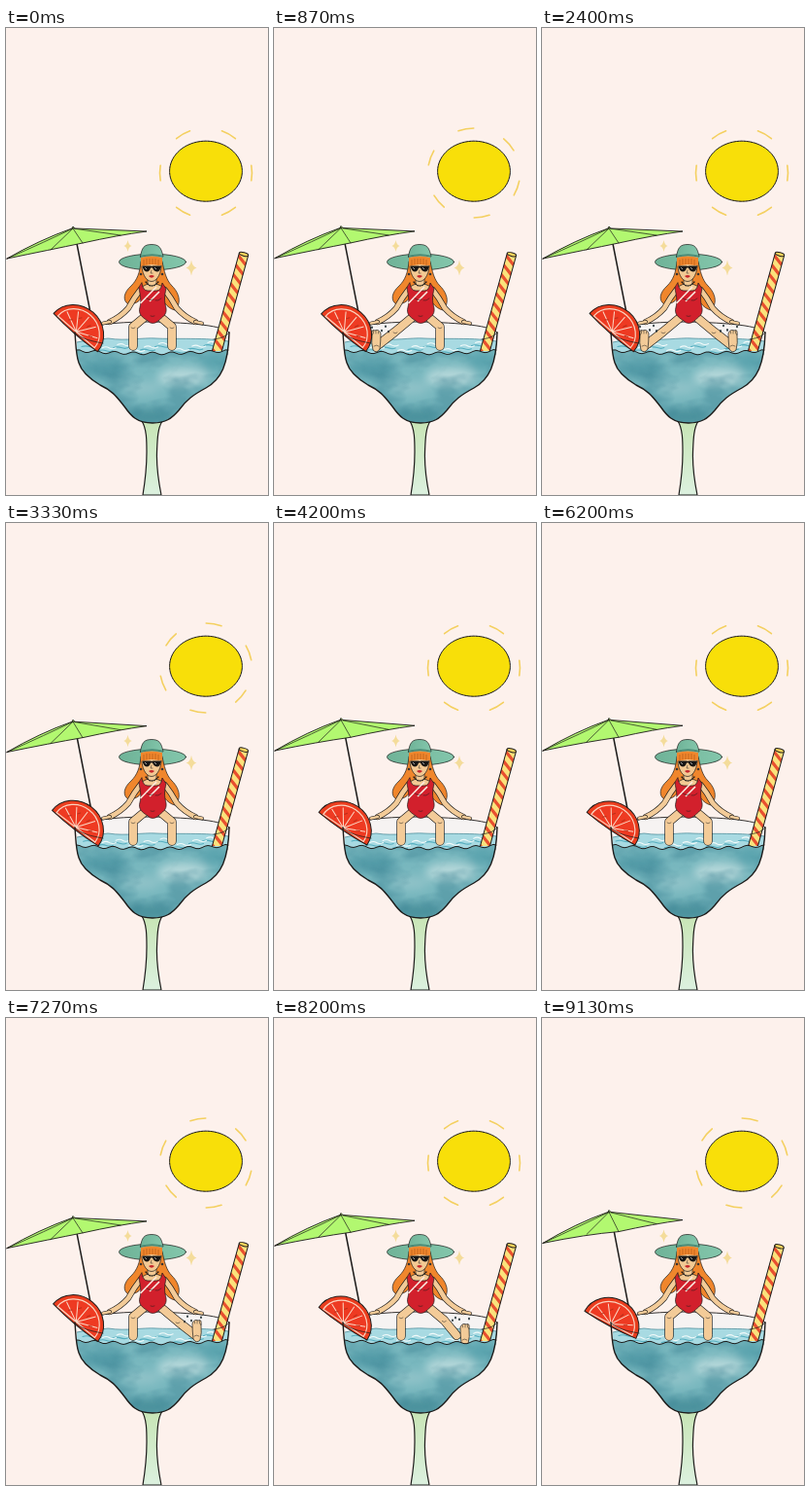
Recreate the animation shown at these times as an HTML page. Size 270x480 px, loop 9190 ms.

```html
<!DOCTYPE html>
<html lang="en">
<head>
<meta charset="utf-8">
<title>Summer cocktail</title>
<style>
html, body { margin: 0; width: 100%; height: 100%; overflow: hidden; background: #fdf1ec; }
svg { display: block; width: 100vw; height: 100vh; }
.ink { stroke: #1d1c1b; stroke-linecap: round; stroke-linejoin: round; }
.line { fill: none; }
.thin { stroke-width: .7; }
.limb { fill: none; stroke-linecap: round; stroke-linejoin: round; }
</style>
</head>
<body>
<svg viewBox="0 0 270 480">
  <defs>
    <filter id="blur" x="-50%" y="-50%" width="200%" height="200%"><feGaussianBlur stdDeviation="5"/></filter>
    <filter id="wash" x="0" y="0" width="100%" height="100%" color-interpolation-filters="sRGB">
      <feTurbulence type="fractalNoise" baseFrequency=".03 .05" numOctaves="3" seed="4"/>
      <feColorMatrix values="0 0 0 0 .22  0 0 0 0 .5  0 0 0 0 .57  3 0 0 0 -1.2"/>
    </filter>
    <linearGradient id="stem" x2="0" y2="1"><stop stop-color="#c8e5b6"/><stop offset="1" stop-color="#dcf1df"/></linearGradient>
    <linearGradient id="felt"><stop stop-color="#6fb398"/><stop offset="1" stop-color="#83c6ab"/></linearGradient>
    <clipPath id="liquid"><path id="liquidShape"/></clipPath>
    <clipPath id="aboveWater"><rect width="270" height="332"/></clipPath>
  </defs>

  <rect width="270" height="480" fill="#fdf1ec"/>

  <ellipse class="ink" cx="206" cy="147.2" rx="37.4" ry="31" fill="#f8df09" stroke-dasharray="3 .5"/>
  <g id="rays" fill="none" stroke="#f4d060" stroke-width="1.6" stroke-linecap="round"></g>

  <path id="stick" class="ink line" stroke-width="1.5"/>
  <path id="canopy" class="ink" fill="#b2f870" stroke-width=".9"/>
  <path id="ribs" class="ink line thin"/>

  <path d="M140 404C145 412 145 424 145 436C145 452 143 468 141 480H160C157 465 155 450 155.500 436C156 424 156 412 161 404Z" class="ink" fill="url(#stem)" stroke-width="1.200"/>
  <path d="M72 315C76 306 110 302 150 302C192 303 225 306 230 313L229 322H73Z" fill="#f6f3f2"/>
  <path d="M72 315C76 306 110 302 150 302C192 303 225 306 230 313" class="ink line" stroke-width=".9"/>
  <path d="M73 323C84 320 95 321 105 319C125 322 140 318 155 319S210 318 229 322V336H73Z" fill="#a8dae2"/>
  <path d="M73 323C84 320 95 321 105 319C125 322 140 318 155 319S210 318 229 322" class="line" stroke="#3f8492" stroke-width=".7"/>
  <g id="ripples" fill="none" stroke-linecap="round"></g>

  <g clip-path="url(#aboveWater)"><g id="straw"></g></g>

  <g id="woman">
    <ellipse class="ink thin" cx="151" cy="240.500" rx="34.500" ry="8.300" fill="url(#felt)"/>
    <path class="ink thin" fill="#f0862c" d="M139 240C138 252 135 259 129 265C121 272 120 280 126 284C135 284 141 279 142 271H159C160 280 166 288 174 290C181 283 179 273 171 265C165 259 163 250 161 240Z"/>
    <path class="ink thin" fill="#f3c993" d="M146 257V263L138 267L140 278H161L164 267L155 263V257Z"/>
    <g id="arms"></g>
    <g id="legs"></g>
    <path class="ink thin" fill="#d2202c" d="M140 262Q141 270 146 270H155Q160 270 161 262L165 268C163 276 163 280 165 288C166 295 161 297 157 301Q151 306 146 301C140 297 136 294 138 287C140 280 138 274 137 267Z"/>
    <path d="M155 266L138.500 283M158 271L148 281" stroke="#fbe9df" stroke-width="1.600" fill="none"/>
    <path d="M145 278Q149 281 152 279M154 280Q157 281 160 278M149 296Q151 297 153 296" class="ink line" stroke-width=".5"/>
    <path d="M144 261Q150 269 157 261" class="ink line" stroke-width="1.300" stroke-dasharray="1 1.500"/>
    <path class="ink thin" fill="#f3c993" d="M140 240C139 251 144 260.500 150 260.500C156 260.500 161 251 160 240Z"/>
    <path fill="#f0862c" d="M139 236Q150 233 161 236L161 244Q156 244 150 243Q144 244 139 245Z"/>
    <path d="M142 238V244M145 237V243M148 237V243M151 237V243M154 237V243M157 238V244" stroke="#a9521a" stroke-width=".6"/>
    <path fill="#171615" d="M140.500 244.500H149.400L150 245L151 244.500H160Q159 250.500 155.500 250.500Q152 250 151 246.500H149Q148 250.500 145 250.500Q141.500 250 140.500 244.500Z"/>
    <path d="M143 246L145 248M153 246L155 248" stroke="#fff" stroke-width=".6"/>
    <path d="M150 249L149 252H151" class="ink line" stroke-width=".5"/>
    <path d="M147 255Q150 253 153 255Q150 258.500 147 255Z" fill="#c6272b"/>
    <circle cx="139" cy="253" r="1.300" fill="#3b3430"/><circle cx="161" cy="253" r="1.300" fill="#3b3430"/>
    <path class="ink thin" fill="url(#felt)" d="M138.500 235C140 226 142 222.500 150 222.500C158 222.500 160 226 162 235Q151 232 138.500 235Z"/>
    <path d="M139 234.500Q151 231.500 161.500 234.500" fill="none" stroke="#4e917c" stroke-width="1.400"/>
  </g>

  <g clip-path="url(#liquid)">
    <rect x="70" y="325" width="165" height="85" fill="#78b7be"/>
    <g filter="url(#blur)">
      <ellipse cx="100" cy="350" rx="26" ry="10" fill="#559ca8"/>
      <ellipse cx="215" cy="342" rx="16" ry="10" fill="#5ba4af"/>
      <ellipse cx="182" cy="359" rx="26" ry="10" fill="#b3d7d9"/>
      <ellipse cx="140" cy="370" rx="20" ry="7" fill="#8fc2c8"/>
      <ellipse cx="148" cy="400" rx="26" ry="10" fill="#4c929d"/>
    </g>
    <rect x="70" y="325" width="165" height="85" filter="url(#wash)" opacity=".4"/>
  </g>
  <path id="waterline" class="ink line"/>

  <g id="slice"></g>
  <path id="glass" class="ink line" stroke-width="1.400"/>
  <path d="M71 313C76 319 88 322 100 324M230 313C226 318 220 319 214 320" class="ink line thin"/>
  <g id="drops" fill="#1f2d33"></g>
  <g id="stars" fill="#f4dc9a"></g>
</svg>

<script>
const LOOP = 9190, FRAMES = 138, SWAY = 12;
const SKIN = '#f3cb98';
const BOWL = 'C72 325 72 336 75 344C78 354 87 361 97 367C110 373 114 379 122 389C129 399 135 406 151 406C165 406 171 401 178 393C186 382 193 377 206 370C222 361 229 346 230 313';
const $ = id => document.getElementById(id);
const mix = (a, b, k) => a + (b - a) * k;
const smooth = x => { x = Math.min(1, Math.max(0, x)); return x * x * (3 - 2 * x); };
const hold = (t, from, to) => smooth((t - from) / 260) * (1 - smooth((t - to) / 260));
const path = (d, attrs = '') => `<path d="${d}" ${attrs}/>`;
const setPath = (id, d) => $(id).setAttribute('d', d);
const mirror = body => `<g transform="translate(302 0) scale(-1 1)">${body}</g>`;

function limb(d, w) {
  return path(d, `class="limb" stroke="#1d1c1b" stroke-width="${w + 1.3}"`) +
         path(d, `class="limb" stroke="${SKIN}" stroke-width="${w}"`);
}

function drawRays(f) {
  const pt = a => `${206 + 47.5 * Math.cos(a)} ${149 + 46 * Math.sin(a)}`;
  let d = '';
  for (let i = 0; i < 6; i++) {
    const a = (i * 60 + f % 3 * 20) * Math.PI / 180;
    d += `M${pt(a - .17)}A47.5 46 0 0 1 ${pt(a + .17)}`;
  }
  $('rays').innerHTML = path(d);
}

function drawUmbrella(s) {
  const top = 205 - 7 * s, left = 237 - 6 * s, right = 209 - 1.5 * s;
  setPath('stick', `M${mix(70.5, 71, s)} ${top + 4}L${mix(92, 93.5, s)} 318`);
  setPath('canopy', `M1 ${left}Q34 ${top + 13} 68 ${top + 1}L69 ${top - 1}L71 ${top + 1}L145 ${right}Q115 ${right + 4} 79 ${right + 12}Q45 ${left - 9} 1 ${left}Z`);
  setPath('ribs', `M69 ${top + 1}Q42 ${top + 14} 1 ${left}M69 ${top + 1}L46 ${left - 9}M69 ${top + 1}L79 ${right + 12}M69 ${top + 1}L118 ${right + 4}`);
}

function buildSlice() {
  let d = '';
  for (let i = 1; i < 6; i++) {
    const a = Math.PI * (1 + i / 6);
    d += `M0 -1L${24 * Math.cos(a)} ${21 * Math.sin(a)}`;
  }
  $('slice').innerHTML =
    path('M-30 0A30 27.5 0 0 1 30 0Q0 3 -30 0Z', 'class="ink" fill="#ea3d1e"') +
    path('M-25 -1A25 22.5 0 0 1 25 -1Z', 'fill="#ee3a22" stroke="#fbd3bf" stroke-width="1.2"') +
    path(d, 'stroke="#fbd8c5" stroke-width="1"') +
    path('M-14 -5L-11 -8M-7 -13L-5 -16M5 -12L7 -16M12 -6L16 -8', 'stroke="#b92e19" stroke-width="1"');
}

function buildStraw() {
  let d = '';
  for (let y = 2; y < 108; y += 10) d += `M-4.8 ${y - 1}L4.8 ${y + 6}V${y + 10}L-4.8 ${y + 3}Z`;
  $('straw').innerHTML =
    path('M-4.8 0V112H4.8V0Z', 'fill="#fbe27c"') + path(d, 'fill="#e8502f"') +
    path('M-4.8 0V112M4.8 0V112', 'class="ink line"') +
    '<ellipse rx="4.8" ry="1.8" class="ink" fill="#f7d35b"/>';
}

// The left leg, from hanging (k = 0) to stretched out (k = 1).
function leg(k) {
  const kx = mix(131, 125, k), ky = mix(307, 312, k);
  let out = limb(`M143 297L${kx} ${ky}L${mix(131, 107, k)} ${mix(327, 326, k)}`, 8);
  out += path(`M${kx - 2} ${ky + 1}q2 2 4 0`, 'class="ink line" stroke-width=".5"');
  if (k > .02) {
    out += `<g transform="translate(0 ${14 - 14 * k})" opacity="${smooth(k * 2)}">` +
      path('M101 315Q100 309 104 311Q108 309 110 314Q110 322 109 330Q106 335 102 331Q100 324 101 315Z', `class="ink thin" fill="${SKIN}"`) +
      path('M102.5 311V314M105 311V314M107.5 312V314M103 327Q106 325 108 327', 'class="ink line" stroke-width=".5"') + '</g>';
  }
  return out;
}

function splash(k, f) {
  if (k < .5) return '';
  return [[101, 307], [111, 309], [115, 306], [118, 310]].map(([x, y], i) =>
    `<ellipse cx="${x}" cy="${y + (f + i * 2) % 4 * .7}" rx=".9" ry="1.3"/>`).join('');
}

function drawWater(f) {
  const ph = f / SWAY * 2 * Math.PI;
  let white = '', blue = '', edge = 'M73 331';
  for (let i = 0; i < 9; i++) {
    const x = 82 + i * 15.5 + 2 * Math.sin(ph + i), y = 324 + i * 5 % 8 + .6 * Math.cos(ph + i * 2);
    white += `M${x} ${y}q4 -2 7 0t7 0`;
    blue += `M${x - 4} ${y + 3}q4 -1.5 8 0t7 0`;
  }
  for (let x = 76; x < 229; x += 3) {
    const bow = 3 * (1 - ((x - 151) / 78) ** 2);
    edge += `L${x} ${331.5 + bow + 1.4 * Math.sin(x / 3.1 + .6 * Math.sin(ph))}`;
  }
  edge += 'L229 331';
  setPath('waterline', edge);
  setPath('liquidShape', edge + 'V410H73Z');
  $('ripples').innerHTML = path(blue, 'stroke="#55aebf" stroke-width="1.1"') +
    path(white, 'stroke="#f1fafa" stroke-width="1.1"');
}

function star(x, y, r) {
  const q = r * .14, w = r * .68;
  return path(`M${x} ${y - r}Q${x + q} ${y - q} ${x + w} ${y}Q${x + q} ${y + q} ${x} ${y + r}Q${x - q} ${y + q} ${x - w} ${y}Q${x - q} ${y - q} ${x} ${y - r}Z`);
}

function draw(f) {
  const t = f * LOOP / FRAMES;
  const s = (1 - Math.cos(f / SWAY * 2 * Math.PI)) / 2;
  const l = hold(t, 550, 2900);
  const r = Math.max(hold(t, 1700, 2900), hold(t, 6700, 8100));
  drawRays(f);
  drawUmbrella(s);
  drawWater(f);
  $('slice').setAttribute('transform', `translate(${mix(71.7, 70.3, s)} ${mix(313, 315.5, s)}) rotate(${mix(41, 27, s)})`);
  $('straw').setAttribute('transform', `translate(${245 - .5 * s} ${232.5 + 2.5 * s}) rotate(15.5)`);
  $('legs').innerHTML = leg(l) + mirror(leg(r));
  $('drops').innerHTML = splash(l, f) + mirror(splash(r, f));
  $('stars').innerHTML = star(125.5, 224, 6 + .8 * s) + star(191, 246.5, 8 - .8 * s);
}

setPath('glass', 'M71 313' + BOWL);
$('liquid').insertAdjacentHTML('beforebegin', `<clipPath id="bowl">${path('M71 313' + BOWL + 'Z')}</clipPath>`);
$('liquid').setAttribute('clip-path', 'url(#bowl)');
buildSlice();
buildStraw();
const arm = limb('M138.5 269Q132 277 126 288Q118 297 107 302', 4.8) + limb('M107 302L100 303.5', 2.5);
$('arms').innerHTML = arm + mirror(arm);

const start = performance.now();
let last = -1;
function tick() {
  const t = (performance.now() - start) % LOOP;
  const f = Math.min(FRAMES - 1, Math.floor((t + 3) * FRAMES / LOOP));
  if (f !== last) draw(last = f);
  requestAnimationFrame(tick);
}
tick();
</script>
</body>
</html>
```
